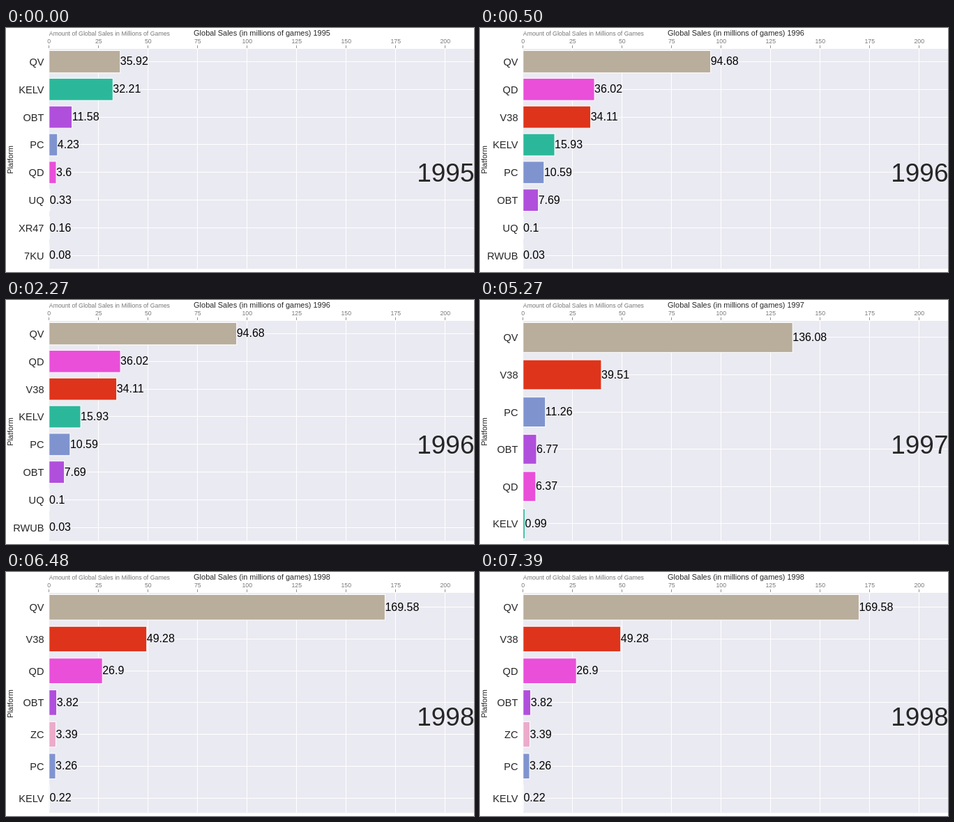
Recreate the animation shown at these times as an HTML page. Size 671 by 351 pixels, loop 8000 ms.

```html
<!DOCTYPE html>
<html lang="en">
<head>
<meta charset="utf-8">
<title>Global Sales</title>
<style>
  html, body { margin: 0; width: 100%; height: 100%; overflow: hidden; background: #fff; }
  svg { display: block; font-family: "Liberation Sans", Arial, sans-serif; fill: #262626; }
  .small { font-size: 8.75px; fill: #777; }
  .title { font-size: 10.95px; }
  .name { font-size: 14.6px; text-anchor: end; }
  .value { font-size: 16px; fill: #000; }
  .year { font-size: 37px; }
  .mid { text-anchor: middle; }
  .grid { stroke: #fff; }
  .tick { stroke: #777; stroke-width: .8; }
</style>
</head>
<body>
<svg id="chart" width="671" height="351" viewBox="0 0 671 351"></svg>
<script>
const LOOP = 8000;
const LEFT = 61.8, SCALE = 2.84;
const TOP = 30, BOTTOM = 346.5;
const BARS_TOP = 32.5, BARS_HEIGHT = 310.8;

const colors = {
  QV: '#b9ad9b', KELV: '#2bb89a', OBT: '#b04fdc', PC: '#7f94cf',
  QD: '#e94fd9', V38: '#de341b', ZC: '#ecabca'
};

const years = [
  { start: 0, year: 1995, sales: { QV: 35.92, KELV: 32.21, OBT: 11.58, PC: 4.23, QD: 3.6, UQ: 0.33, XR47: 0.16, '7KU': 0.08 } },
  { start: 500, year: 1996, sales: { QV: 94.68, QD: 36.02, V38: 34.11, KELV: 15.93, PC: 10.59, OBT: 7.69, UQ: 0.1, RWUB: 0.03 } },
  { start: 3450, year: 1997, sales: { QV: 136.08, V38: 39.51, PC: 11.26, OBT: 6.77, QD: 6.37, KELV: 0.99 } },
  { start: 6480, year: 1998, sales: { QV: 169.58, V38: 49.28, QD: 26.9, OBT: 3.82, ZC: 3.39, PC: 3.26, KELV: 0.22 } }
];

const chart = document.getElementById('chart');
const xOf = value => LEFT + value * SCALE;
const snap = v => Math.floor(v) + 0.5;
const text = (cls, x, y, label, extra = '') =>
  `<text class="${cls}" x="${x}" y="${y}" ${extra}>${label}</text>`;
const line = (cls, x1, y1, x2, y2) =>
  `<line class="${cls}" x1="${x1}" y1="${y1}" x2="${x2}" y2="${y2}"/>`;

function axis() {
  let out = `<rect x="${LEFT}" y="${TOP}" width="610" height="${BOTTOM - TOP}" fill="#eaeaf2"/>`;
  for (let v = 0; v <= 200; v += 25) {
    const x = snap(xOf(v));
    out += line('grid', x, TOP, x, BOTTOM) + line('tick', x, 25, x, 29)
      + text('small mid', xOf(v), 21.5, v);
  }
  return out;
}

function bars(sales) {
  const rows = Object.entries(sales).sort((a, b) => b[1] - a[1]);
  const pitch = BARS_HEIGHT / (rows.length - 0.2);
  return rows.map(([name, value], i) => {
    const y = BARS_TOP + (i + 0.4) * pitch;
    return line('grid', LEFT, snap(y), 671, snap(y))
      + `<rect x="${LEFT}" y="${y - 0.4 * pitch}" width="${value * SCALE}" height="${0.8 * pitch}"
          fill="${colors[name] || '#fff'}" stroke="#fff"/>`
      + text('name', 54.5, y + 5.5, name)
      + text('value', xOf(value), y + 5, value);
  }).join('');
}

function draw({ year, sales }) {
  chart.innerHTML = axis() + bars(sales)
    + text('small', LEFT, 10.6, 'Amount of Global Sales in Millions of Games')
    + text('title mid', 367, 11, `Global Sales (in millions of games) ${year}`)
    + text('title mid', 0, 0, 'Platform', 'transform="translate(10 189.5) rotate(-90)"')
    + text('year', 589.2, 221, year);
}

let shown;
function tick() {
  const t = performance.now() % LOOP;
  const current = years.filter(y => y.start <= t).pop();
  if (current !== shown) draw(shown = current);
  requestAnimationFrame(tick);
}
tick();
</script>
</body>
</html>
```
